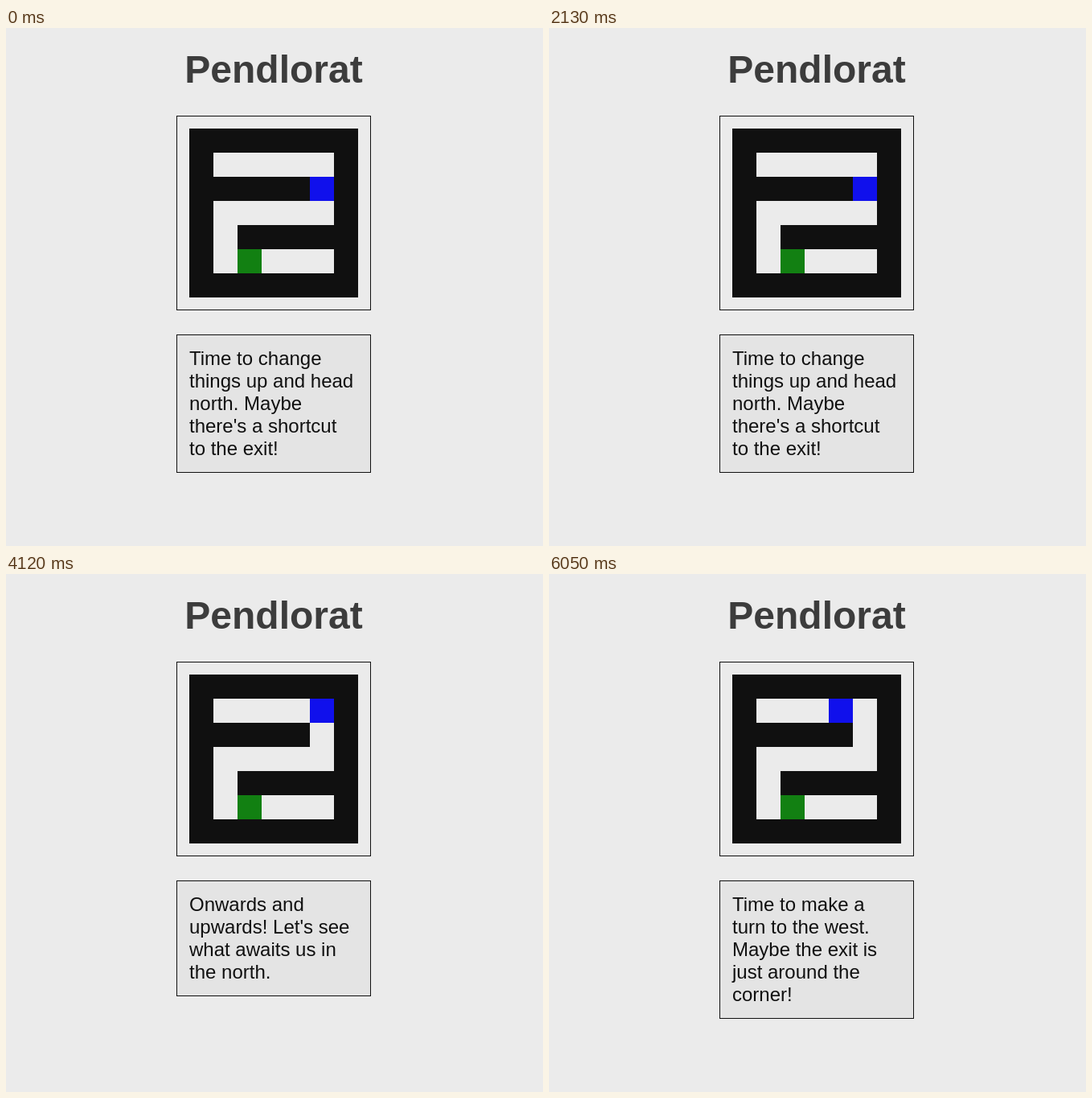
Recreate the animation shown at these times as an HTML page with a canvas. Size 668 px wide and 644 px high, loop 8000 ms.

```html
<!DOCTYPE html>
<html lang="en">
<head>
<meta charset="utf-8">
<title>Maze</title>
<style>
  html, body { margin: 0; width: 100%; height: 100%; overflow: hidden; background: #ebebeb; }
  body { position: relative; font-family: "Liberation Sans", Arial, sans-serif; }
  h1 {
    position: absolute; left: 0; top: 24px; width: 666px; margin: 0;
    font-size: 48px; line-height: 55px; text-align: center; color: #3c3c3c;
  }
  canvas, #speech {
    position: absolute; left: 212px; width: 210px; padding: 15px; border: 1px solid #101010;
  }
  canvas { top: 109px; height: 210px; }
  #speech {
    top: 381px; background: #e4e4e4; color: #101010;
    font-size: 24px; line-height: 28px; white-space: pre;
  }
</style>
</head>
<body>
<h1>Pendlorat</h1>
<canvas id="maze" width="210" height="210"></canvas>
<div id="speech"></div>
<script>
const LOOP = 8000;
const CELL = 30;
const maze = [
  "#######",
  "#.....#",
  "#####.#",
  "#.....#",
  "#.#####",
  "#.E...#",
  "#######"
];
const colors = { "#": "#101010", ".": "#ebebeb", E: "#128012" };
const BOT = "#1010ec";

const steps = [
  { at: 0, col: 5, row: 2,
    text: "Time to change\nthings up and head\nnorth. Maybe\nthere's a shortcut\nto the exit!" },
  { at: 2460, col: 5, row: 1,
    text: "Onwards and\nupwards! Let's see\nwhat awaits us in\nthe north." },
  { at: 5840, col: 4, row: 1,
    text: "Time to make a\nturn to the west.\nMaybe the exit is\njust around the\ncorner!" }
];

const ctx = document.getElementById("maze").getContext("2d");
const speech = document.getElementById("speech");
let shown = null;

function fillCell(col, row, color) {
  ctx.fillStyle = color;
  ctx.fillRect(col * CELL, row * CELL, CELL, CELL);
}

function show(step) {
  maze.forEach((line, row) =>
    [...line].forEach((kind, col) => fillCell(col, row, colors[kind])));
  fillCell(step.col, step.row, BOT);
  speech.textContent = step.text;
  shown = step;
}

const start = performance.now();
function tick() {
  const time = (performance.now() - start) % LOOP;
  const step = steps.filter(s => s.at <= time).pop();
  if (step !== shown) show(step);
  requestAnimationFrame(tick);
}
tick();
</script>
</body>
</html>
```
